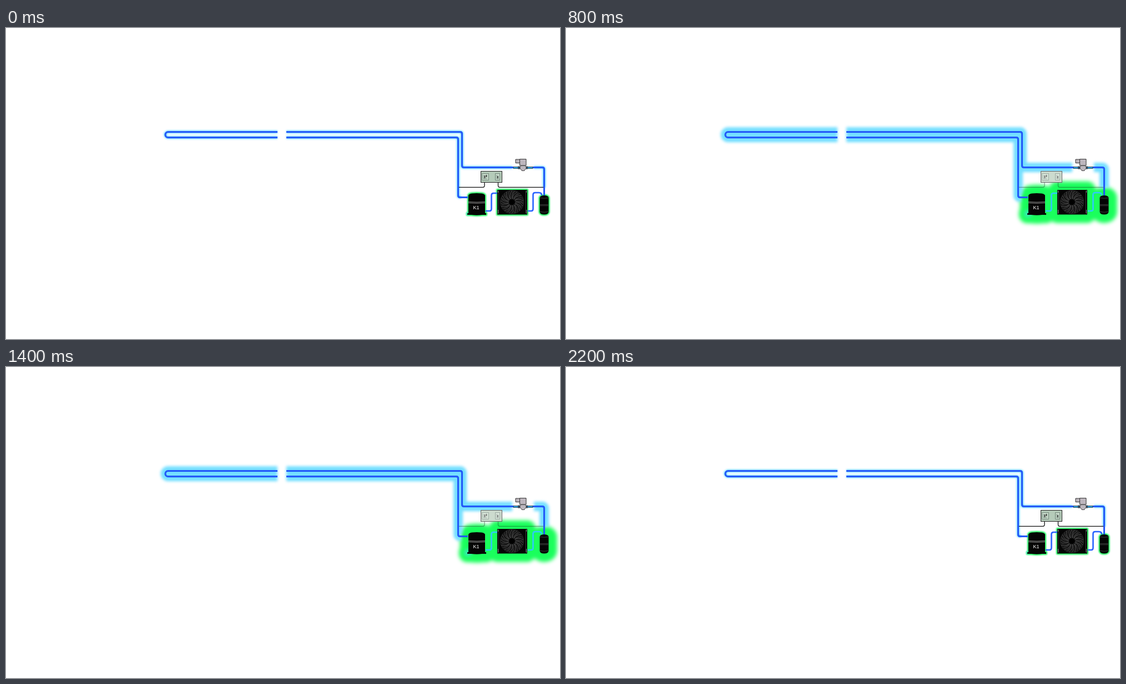
An HTML page for the animation above (2.3 s loop, 998x561 px).

```html
<!DOCTYPE html>
<html lang="en">
<head>
<meta charset="utf-8">
<title>Cooling circuit</title>
<style>
  html, body { margin: 0; width: 100%; height: 100%; overflow: hidden; background: #fff; }
  svg { display: block; width: 998px; height: 561px; }
  .line { fill: none; }
  .glow { stroke-linejoin: round; }
  text { font: 9px "Liberation Sans", Arial, sans-serif; fill: #fff; }
</style>
</head>
<body>
<svg viewBox="0 0 998 561">
  <defs>
    <path id="loop" d="M489 187.5H292a5 5 0 0 0 0 10H489M505 187.5H818q3.5 0 3.5 3.5V248q0 3.5 3.5 3.5H914M505 197.5H811q3.5 0 3.5 3.5V302q0 3.5 3.5 3.5H832M949 251.5H966q3.5 0 3.5 3.5V302"/>
    <path id="halo" d="M489 187.5H292a5 5 0 0 0 0 10H489M505 187.5H818q3.5 0 3.5 3.5V248q0 3.5 3.5 3.5H912M505 197.5H811q3.5 0 3.5 3.5V302q0 3 3 3H820M951 251.5H966q3.5 0 3.5 3.5V288"/>
    <path id="links" d="M864 330H871q3.5 0 3.5-4V302q0-4 4-4H885M940 330H946q3.5 0 3.5-4V301q0-4 4-4H960q5 0 5 5"/>
    <g id="units">
      <path d="M833 302q1-3 6-3.500q9-1 18 0q5 .5 6 3.500V334h2v3h-7q-10 1.500-20 0h-7v-3h2z"/>
      <path d="M885 292h54v44.500h-54z"/>
      <path d="M961.500 306q1-4 8-4t8 4V332q-1 4.500-8 4.500t-8-4.500z"/>
    </g>
  </defs>

  <use id="green" class="glow" href="#units" fill="#1aff5c" stroke="#1aff5c"/>
  <use id="blue" class="glow line" href="#halo" stroke="#74dfff"/>
  <circle id="spot" cx="832" cy="335" fill="#4fdcff" opacity=".55"/>

  <path id="cables" class="line" stroke="#111" stroke-width="1.300" d="M862 279v5q0 3.300-3 3.300H816M886.500 279v5q0 3.300 3 3.300H969"/>
  <use href="#loop" class="line" stroke="#123cf5" stroke-width="3"/>
  <use href="#loop" class="line" stroke="#3b86ff" stroke-width=".9"/>
  <use id="linkEdge" href="#links" class="line" stroke-width="2.600"/>
  <use href="#links" class="line" stroke="#4fa0ff" stroke-width=".7"/>

  <!-- control box -->
  <g stroke="#222">
    <rect x="855.500" y="258.500" width="38" height="20" fill="#b5cbb9"/>
    <path d="M857.500 262.500h12v12h-12zM881.500 262.500h8v12h-8z" fill="#c3d6c6" stroke="#61756a" stroke-width=".8"/>
    <path class="line" stroke-width="1.500" d="M862.500 266v5M865.500 265v4M886 267v4"/>
    <path class="line" stroke="#61756a" stroke-width=".7" d="M860 265v7h7M884 265v7h4"/>
  </g>
  <rect id="wash" x="855" y="258" width="39" height="21" fill="#fff"/>

  <!-- valve -->
  <g stroke="#333" fill="#bdb6bd">
    <path d="M914 250.500h35v3h-35z" fill="#2aa5e8" stroke-width=".8"/>
    <path d="M922 249.500h4v5h-4zM936 249.500h4v5h-4z" fill="#334a60" stroke="none"/>
    <path d="M926 250l3-2h5l3 2v4l-3 2v1.500h-5V256l-3-2z" stroke-width=".8"/>
    <path d="M918 237h7.500v6.500H918zM925.500 236.500h11.500v11.500h-11.500z"/>
  </g>

  <use href="#units" fill="#050505"/>
  <path class="line" stroke="#a5a5a5" stroke-width=".8" d="M833 313.500q15 1.500 30 0M833 315.500q15 1.500 30 0"/>
  <path class="line" stroke="#555" stroke-width=".7" d="M887.500 294v40M936.500 294v40M962 306.500q7.500 1.500 15 0M962 318.500h15M962 320.500h15M962 331.500q7.500 1.500 15 0"/>
  <path class="line" stroke="#aaa" stroke-width=".7" d="M886.500 293v4M937.500 293v4M886.500 328v7M937.500 328v7"/>
  <text x="841.500" y="327">K1</text>
  <g transform="translate(911.500 314)">
    <g id="fan" class="line" stroke="#999" stroke-width=".6"></g>
    <circle r="20.800" class="line" stroke="#555" stroke-width=".6"/>
    <circle r="5.300" fill="#000"/>
  </g>
</svg>
<script>
const el = id => document.getElementById(id);
const set = (id, name, value) => el(id).setAttribute(name, value);
const polar = (r, a) => `${(r * Math.cos(a)).toFixed(2)} ${(r * Math.sin(a)).toFixed(2)}`;

// Curved blades crossed by short slats
let blades = '';
for (let i = 0; i < 13; i++) {
  const a = i / 13 * 2 * Math.PI;
  blades += `<path d="M${polar(5, a)}Q${polar(13, a - .12)} ${polar(20.5, a + .35)}"/>`;
  for (let r = 7; r < 20; r += 2.2) {
    const b = a + (r - 5) * .022;
    blades += `<path d="M${polar(r, b + .08)}L${polar(r + 1.6, b + .38)}" opacity=".8"/>`;
  }
}
el('fan').innerHTML = blades;

const mix = (a, b, k) => a.map((v, i) => Math.round(v + (b[i] - v) * k));

function setGlow(id, spread, blur) {
  set(id, 'stroke-width', 2 * spread);
  el(id).style.filter = `blur(${blur}px)`;
}

function draw(now) {
  const step = Math.floor(now % 2300 / 100);
  const n = 11 - Math.abs(11 - step);
  setGlow('green', 2 + 1.65 * n, 1.2 + .32 * n);
  setGlow('blue', 2.8 + .7 * n, 1.7 + .13 * n);
  set('spot', 'r', 3 + .5 * n);
  el('spot').style.filter = `blur(${1.5 + .2 * n}px)`;
  set('cables', 'opacity', 1 - .078 * n);
  set('wash', 'opacity', Math.max(0, n - 4) * .075);
  set('linkEdge', 'stroke', `rgb(${mix([22, 72, 255], [35, 218, 255], Math.min(1, n / 6))})`);
}

const start = performance.now();
function tick() {
  draw(performance.now() - start);
  requestAnimationFrame(tick);
}
tick();
</script>
</body>
</html>
```
